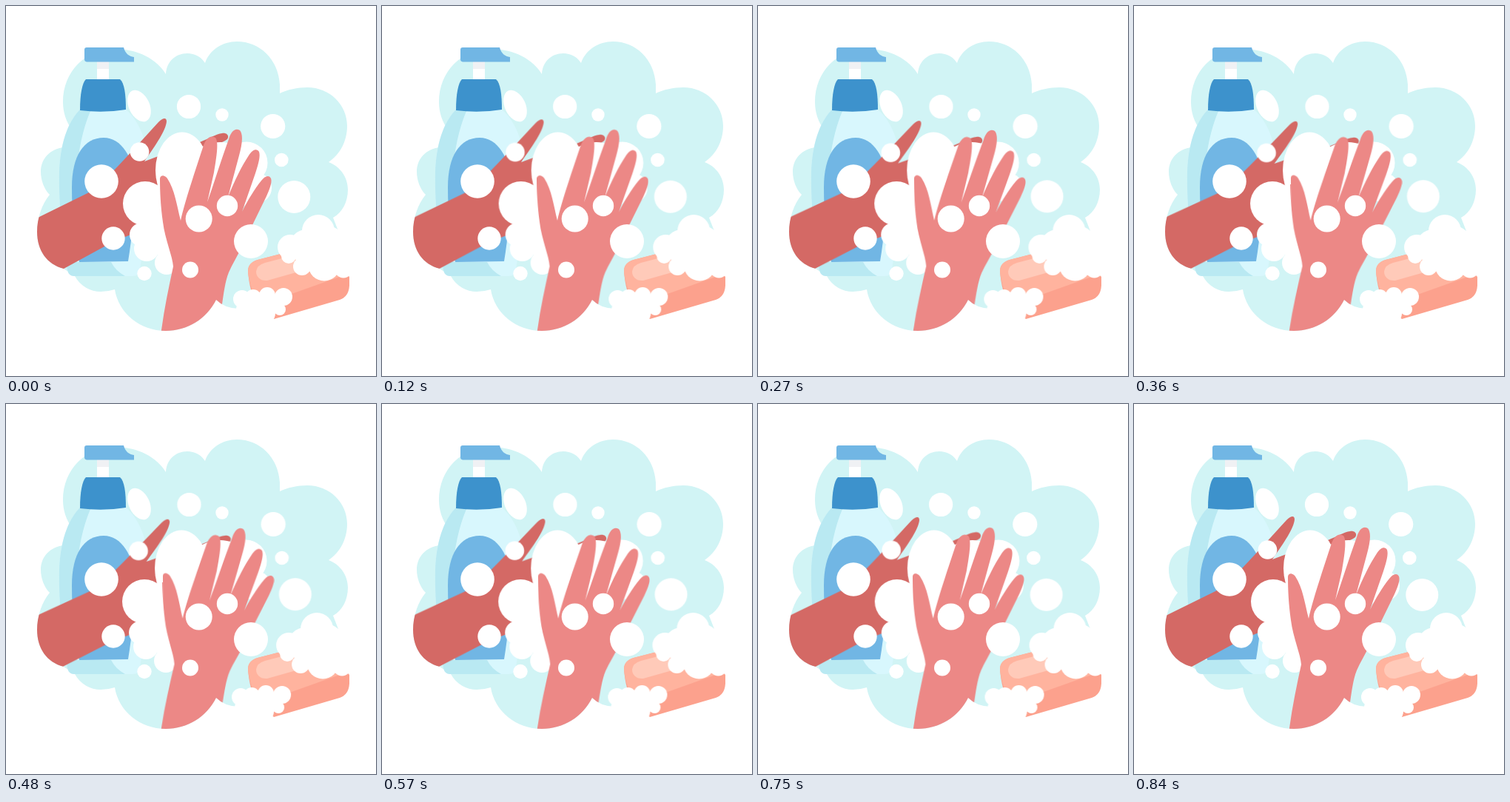
Recreate the animation shown at these times as an HTML page. Size 500 px wide and 500 px high, loop 900 ms.

```html
<!DOCTYPE html>
<html lang="en">
<head>
<meta charset="utf-8">
<title>Hand washing</title>
<style>
html, body { margin: 0; width: 100%; height: 100%; overflow: hidden; background: #fff; }
svg { display: block; width: 100%; height: 100%; }
.move {
  --x: 0px; --y: 0px; --r: 0deg;
  transform-box: view-box;
  animation: rub 900ms infinite;
}
/* out and back, then a short rest */
@keyframes rub {
  0% { transform: none; animation-timing-function: cubic-bezier(.3, .25, .6, 1); }
  46.667% { transform: translate(var(--x), var(--y)) rotate(var(--r)); animation-timing-function: cubic-bezier(.4, 0, .7, .75); }
  93.333%, 100% { transform: none; }
}
.back { --r: 1.63deg; transform-origin: 80px 310px; }
.front { --r: 1.05deg; transform-origin: 250px 440px; }
.lather { --x: -1px; }
.suds { --x: -2px; }
.right { --x: 1.6px; --y: -.8px; }
.left { --x: -1.5px; --y: 1.5px; }
.drift { --x: .5px; }
.white { fill: #fff; }
</style>
</head>
<body>
<svg viewBox="0 0 500 500">
  <defs>
    <path id="cloud" d="M90 168C81 157 77 143 77 130C77 88 108 58 147 58C178 58 204 72 216 92C217 75 229 64 245 64C255 64 264 69 269 77C275 59 293 48 312 48C343 48 368 72 370 106V118C380 113 394 110 407 110C438 110 461 134 461 162C461 182 452 200 436 211C452 217 462 232 462 248C462 264 455 279 442 286L449 304L380 345L370 400L315 409Q296 409 284 397C271 423 245 439 216 439C181 439 152 415 147 383Q138 386 128 386C114 386 101 379 93 365L78 355C55 349 42 330 42 305C42 288 48 268 59 255C52 248 47 236 47 224C47 206 60 193 78 191Z"/>
    <clipPath id="edge"><use href="#cloud"/></clipPath>
  </defs>

  <use href="#cloud" fill="#d1f4f5"/>
  <ellipse class="white" cx="180" cy="135" rx="14" ry="22.5" transform="rotate(-25 180 135)"/>

  <g id="bottle">
    <path fill="#d8f7fd" d="M100 140H162C180 155 192 183 193 222C193 275 186 320 181 357Q179 365 172 365H92Q85 365 83 357C77 320 71 270 72 225C73 188 83 157 100 140Z"/>
    <path fill="#b9e9f2" d="M100 140H115C106 160 98 190 96 225V346H142Q148 358 161 365H92Q85 365 83 357C77 320 71 270 72 225C73 188 83 157 100 140Z"/>
    <path fill="#71b6e4" d="M99 346C92 315 89 280 89 245C89 203 105 178 132 178C156 178 173 205 174 240C174 275 170 315 165 345Z"/>
    <path fill="#fff" d="M123 75H139V100H123Z"/>
    <path fill="#f0f1f4" d="M123 75H139V85H123Z"/>
    <path fill="#3d92cc" d="M100 141C100 119 103 104 108 99H154C160 104 162 119 162 140Q131 145 100 141Z"/>
    <path fill="#71b6e4" d="M109 56H159C161 64 166 68 173 69V75.5H109Q106 75 106 72V59Q106 56 109 56Z"/>
  </g>

  <g clip-path="url(#edge)">
    <path class="move back" fill="#d46965" d="M20 298L47 284L110 253C128 244 136 235 146 222C164 203 186 179 206 157C212 151 217 150 217 156C216 168 203 187 187 210L203 204L262 184C274 179 284 173 292 172C299 171 302 176 299 180C292 186 278 188 263 190L240 290L200 300C175 306 155 313 133 325L78 355L50 372Z"/>
  </g>

  <g class="white move lather">
    <ellipse cx="238" cy="222" rx="36" ry="51.5"/>
    <circle cx="188" cy="267" r="30"/>
    <circle cx="183" cy="309" r="16"/>
    <circle cx="190" cy="328" r="17"/>
    <circle cx="217" cy="347" r="16"/>
    <circle cx="216" cy="306" r="32"/>
    <circle cx="238" cy="270" r="32"/>
    <circle cx="290" cy="233" r="49"/>
    <circle cx="325" cy="212" r="28.5"/>
    <circle cx="339" cy="246" r="20"/>
  </g>

  <g clip-path="url(#edge)">
    <path class="move front" fill="#ec8886" d="M208 455L210 438C214 408 220 380 226 352C225 338 215 316 212 292C209 270 208 252 208 233C209 228 214 228 218 233C228 248 231 270 236 290C242 263 256 222 267 188C271 178 277 174 283 178C288 183 284 207 281 225L272 265C281 240 291 207 301 180C304 169 310 164 316 168C321 174 319 187 315 202L300 258C308 238 318 217 328 202C333 194 339 192 342 197C344 203 341 214 337 226L319 278C327 262 336 247 345 236C350 229 356 228 358 233C360 238 356 248 352 257L331 300C325 318 311 338 301 360C296 372 294 390 292 403L288 455Z"/>
  </g>

  <g id="soap">
    <path fill="#fca18d" d="M340 343L375 334L445 345L464 366V378Q463 393 451 397L362 423L340 405C333 394 328 376 327 358Q327 347 340 343Z"/>
    <path fill="#ffb39e" d="M340 343L375 334L445 345L462 362L386 389Q350 398 335 389C330 378 328 369 327 358Q327 347 340 343Z"/>
    <path fill="#ffcab9" d="M350 347L392 336V360L353 371C344 372 338 366 338 359Q339 350 350 347Z"/>
  </g>
  <g class="white move suds">
    <circle cx="384" cy="326" r="17"/>
    <circle cx="406" cy="325" r="23"/>
    <circle cx="422" cy="304" r="22"/>
    <circle cx="430" cy="328" r="32"/>
    <circle cx="430" cy="350" r="21.5"/>
    <circle cx="400" cy="352" r="12"/>
    <circle cx="382" cy="338" r="10"/>
    <circle cx="456" cy="355" r="12.5"/>
    <circle cx="319" cy="396" r="12"/>
    <circle cx="334" cy="394" r="11"/>
    <circle cx="353" cy="391" r="11"/>
    <circle cx="375" cy="393" r="12"/>
    <circle cx="370" cy="410" r="8"/>
    <circle cx="351" cy="403" r="18"/>
    <circle cx="348" cy="415" r="16"/>
    <circle cx="324" cy="410" r="13"/>
  </g>

  <g id="bubbles" class="white">
    <circle class="move drift" cx="247" cy="136" r="16.1"/>
    <circle cx="292" cy="147" r="8.7"/>
    <circle class="move drift" cx="360.7" cy="162.5" r="16.6"/>
    <circle class="move drift" cx="372.3" cy="208" r="9.3"/>
    <circle class="move right" cx="389.3" cy="258" r="22"/>
    <circle cx="331" cy="318" r="23"/>
    <circle cx="299" cy="270" r="14.2"/>
    <circle cx="260.7" cy="287.5" r="18"/>
    <circle cx="249" cy="356.5" r="11"/>
    <circle cx="187" cy="361.5" r="9.7"/>
    <circle cx="145" cy="314" r="15.7"/>
    <circle cx="129" cy="237" r="22.8"/>
    <circle class="move left" cx="180.5" cy="197" r="12.8"/>
  </g>
</svg>
</body>
</html>
```
